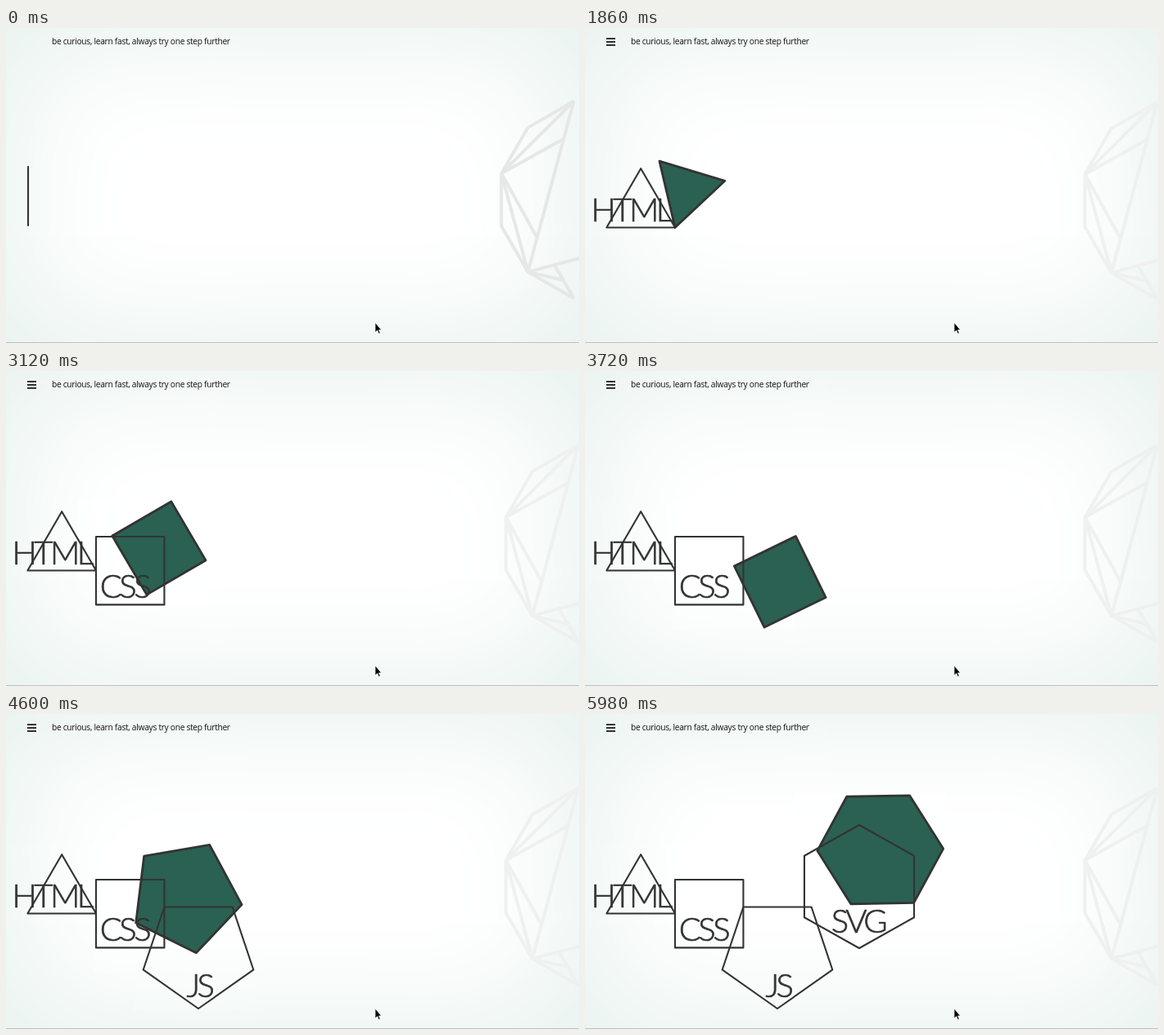
Animation, 700 px wide and 386 px high, one loop 6000 ms. Source, as an HTML page:

```html
<!DOCTYPE html>
<html lang="en">
<head>
<meta charset="utf-8">
<title>Rolling shapes</title>
<style>
  html, body { margin: 0; width: 100%; height: 100%; overflow: hidden; background: #fff; }
  #stage {
    position: absolute; left: 0; top: 0; width: 700px; height: 386px; overflow: hidden;
    box-shadow: inset 0 0 160px #e2efeb;
  }
  svg { display: block; }
  .motto { font: 10.2px "Open Sans", "Noto Sans", sans-serif; letter-spacing: -.28px; fill: #111; }
  .label {
    font: 300 40px Lato, "Open Sans", sans-serif; letter-spacing: -3.5px; text-anchor: middle;
    fill: #333; stroke: #333; stroke-width: .7; stroke-linejoin: round;
  }
  .outline { fill: none; stroke: #333; stroke-width: 2.1; stroke-linejoin: round; }
  #roller { fill: #2a6152; stroke: #333; stroke-linejoin: round; }
</style>
</head>
<body>
<div id="stage">
<svg width="700" height="386" viewBox="0 0 700 386">
  <path id="gem" fill="none" stroke-width="4" stroke-linejoin="round"/>
  <path id="menu" d="M26 13H37M26 17H37M26 21H37" stroke="#333" stroke-width="1.8"/>
  <text class="motto" x="56" y="20">be curious, learn fast, always try one step further</text>
  <polygon id="roller"/>
  <g id="trail"></g>
  <path d="M0 385.5H700" stroke="#bcc0bf"/>
  <path d="M451 361V373L453.7 370.6L455.4 374.6L457.2 373.8L455.5 369.9H458.6Z"
    fill="#000" stroke="#fff" stroke-width=".7"/>
</svg>
</div>
<script>
const LOOP = 6000;
const FIRST_ROLL = 1274, PERIOD = 1467, ROLL = 1146;

const $ = id => document.getElementById(id);
const lerp = (a, b, k) => a + (b - a) * k;
const mix = (p, q, k) => [lerp(p[0], q[0], k), lerp(p[1], q[1], k)];
const progress = (t, from, to) => Math.min(1, Math.max(0, (t - from) / (to - from)));
const polar = ([x, y], rx, ry, degrees) => {
  const a = degrees * Math.PI / 180;
  return [x + rx * Math.cos(a), y + ry * Math.sin(a)];
};

const polygon = (n, center, rx, ry, tilt) =>
  Array.from({ length: n }, (_, i) => polar(center, rx, ry, tilt + i * 360 / n));

const turn = (points, pivot, degrees) => points.map(([x, y]) => {
  const dx = x - pivot[0], dy = y - pivot[1], r = Math.hypot(dx, dy);
  return polar(pivot, r, r, Math.atan2(dy, dx) * 180 / Math.PI + degrees);
});

// Every new corner grows out of the closest old corner or edge middle, corners preferred
function morph(from, to, k) {
  const middles = from.map((p, i) => mix(p, from[(i + 1) % from.length], 0.5));
  return to.map(corner => {
    const gap = p => Math.hypot(p[0] - corner[0], p[1] - corner[1]);
    const best = list => list.reduce((a, b) => gap(b) < gap(a) ? b : a);
    const near = best(from), middle = best(middles);
    return mix(gap(middle) * 1.1 < gap(near) ? middle : near, corner, k);
  });
}

const steps = [
  { shape: polygon(3, [68.2, 220.4], 48.3, 48.2, 30), pivot: [110, 244.5], spin: 150, text: "HTML", at: [55.5, 236.5] },
  { shape: polygon(4, [151.7, 244.7], 59, 59, 45), pivot: [193.4, 261.5], spin: 180, text: "CSS", at: [144.5, 277.5] },
  { shape: polygon(5, [235, 292.2], 70.8, 68.8, 90), pivot: [284.8, 244.6], spin: 180, text: "JS", at: [236, 346.5] },
  { shape: polygon(6, [335, 211.5], 77.4, 75.5, 90), pivot: [437, 239.7], spin: 180, text: "SVG", at: [333.5, 267.5] }
];

function add(name, attributes) {
  const node = document.createElementNS("http://www.w3.org/2000/svg", name);
  for (const key in attributes) node.setAttribute(key, attributes[key]);
  return $("trail").appendChild(node);
}

steps.forEach((step, i) => {
  step.start = FIRST_ROLL + i * PERIOD;
  step.outline = add("polygon", { class: "outline", points: step.shape.join(" ") });
  step.label = add("text", { class: "label", x: step.at[0], y: step.at[1] });
  step.label.textContent = step.text;
});

// The gem is a twelve-sided ring, cut off by the stage, with a few chords
function gemPath() {
  const [a, b, c, d, e, f] = polygon(12, [726, 210.5], 125, 125, 105).map(p => p);
  const lines = [
    [a, b, c, d, e, f], [f, d, b, f],
    [d, mix(f, b, 0.22)], [d, mix(f, b, 0.8)],
    [[705, 281], b, [681, 309]], [[671, 292], a]
  ];
  return lines.map(line => "M" + line.join("L")).join("");
}

function introShape(t) {
  const foot = [27, 242];
  const length = lerp(72, 80, progress(t, 40, 120));
  const line = turn([foot, [foot[0], foot[1] - length]], foot, 90 * progress(t, 515, 1000));
  return t < 1000 ? line : morph(line, polygon(3, [67, 219], 46, 46, 30), progress(t, 1000, 1180));
}

function rollerShape(t) {
  const i = Math.floor((t - FIRST_ROLL) / PERIOD);
  if (i < 0) return introShape(t);
  const { shape, pivot, spin, start } = steps[i];
  const rolled = turn(shape, pivot, spin * progress(t, start, start + ROLL));
  return t < start + ROLL ? rolled : morph(rolled, steps[i + 1].shape, progress(t, start + ROLL, start + PERIOD));
}

function draw(time) {
  // The motion drags for a moment while the pentagon rolls
  const t = time - 125 * progress(time, 4970, 5190);

  const settled = progress(t, 40, 600);
  const shade = lerp(230, 239, settled);
  $("gem").setAttribute("transform", `translate(${5.5 * settled} ${settled})`);
  $("gem").setAttribute("stroke", `rgb(${shade},${shade + 1},${shade + 1})`);
  $("menu").setAttribute("opacity", progress(t, 40, 400));

  const filling = progress(t, 1260, 1380);
  $("roller").setAttribute("points", rollerShape(t).join(" "));
  $("roller").setAttribute("fill-opacity", filling);
  $("roller").setAttribute("stroke-width", lerp(2.1, 2.8, filling));

  for (const { start, outline, label } of steps) {
    outline.setAttribute("opacity", t >= start ? 1 : 0);
    label.setAttribute("opacity", progress(t, start, start + 160));
  }
}

$("gem").setAttribute("d", gemPath());
const began = performance.now();
function frame() {
  draw((performance.now() - began) % LOOP);
  requestAnimationFrame(frame);
}
draw(0);
requestAnimationFrame(frame);
</script>
</body>
</html>
```
